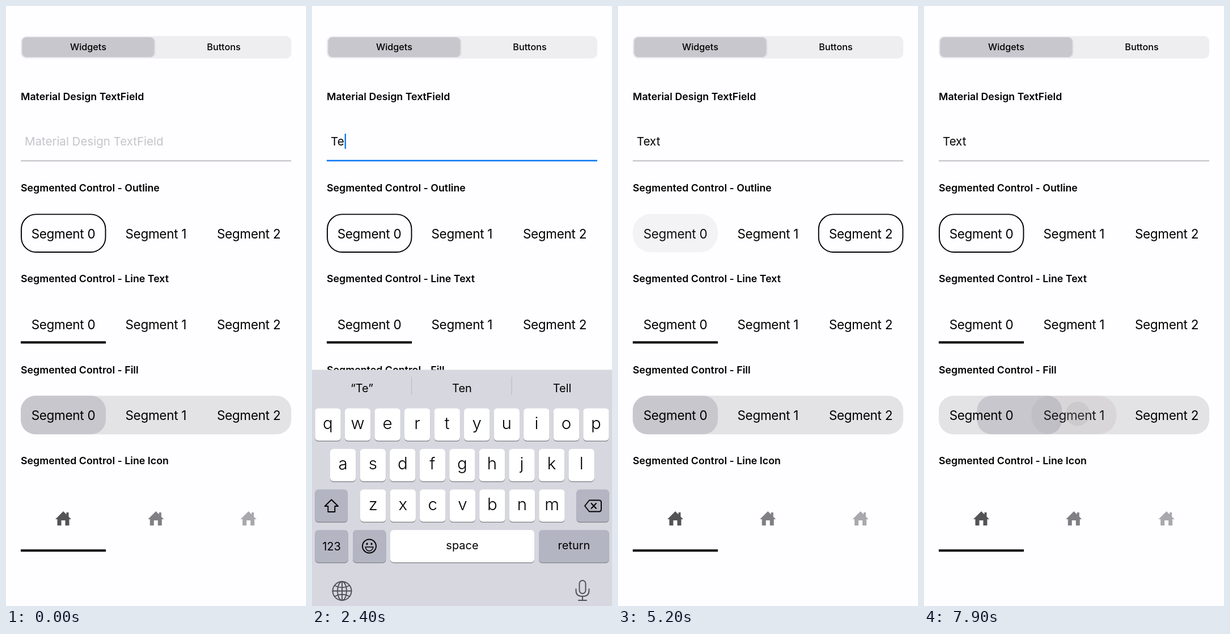
These frames come from a looping animation (529x1058 px, 8000 ms). An HTML page:

```html
<!DOCTYPE html>
<html lang="en">
<head>
<meta charset="utf-8">
<title>Widgets</title>
<style>
  html, body { margin: 0; width: 100%; height: 100%; overflow: hidden; background: #fefdff; }
  svg { display: block; width: 100%; height: 100%; font-family: Inter, "Open Sans", sans-serif; }
  .heading { font-size: 17.8px; font-weight: 600; }
  .tab { font-size: 16.2px; font-weight: 500; }
  .segment { font-size: 22.5px; letter-spacing: -.3px; }
  .field { font-size: 20.5px; }
  .letter { font-size: 27.5px; }
  .small.letter { font-size: 29.5px; font-weight: 300; }
  .label { font-size: 20px; }
  .preview { font-size: 40px; }
  .mid { text-anchor: middle; }
  .ink { fill: none; stroke: #000; stroke-width: 1.9; stroke-linejoin: round; stroke-linecap: round; }
  .tool { fill: none; stroke: #4e5057; stroke-width: 1.9; stroke-linecap: round; }
</style>
</head>
<body>
<svg id="stage" viewBox="0 0 529 1058"></svg>
<script>
const LOOP = 8000, STEP = 100;
const BLUE = '#0f7af0', DARK_KEY = '#b3b5c2', KEYBOARD_HEIGHT = 417;
const stage = document.getElementById('stage');

function set(node, attrs) {
  for (const name in attrs) node.setAttribute(name, attrs[name]);
  return node;
}
function add(parent, tag, attrs) {
  return parent.appendChild(set(document.createElementNS('http://www.w3.org/2000/svg', tag), attrs));
}
function box(parent, x, y, width, height, rx, fill, more) {
  return add(parent, 'rect', { x, y, width, height, rx, fill, ...more });
}
function write(parent, x, y, style, content, more) {
  const node = add(parent, 'text', { x, y, class: style, ...more });
  node.textContent = content;
  return node;
}
function path(parent, d, more) {
  return add(parent, 'path', { d, ...more });
}
function show(node, visible) {
  node.style.display = visible ? '' : 'none';
}
const clamp = u => Math.max(0, Math.min(1, u));
const easeOut = u => 1 - (1 - clamp(u)) ** 4;

// Tab bar
box(stage, 26, 53, 477, 39.5, 9.5, '#eeedf0');
box(stage, 27.5, 55, 236, 36, 8.5, '#e0dfe3');
box(stage, 28.5, 55, 233, 35, 8, '#c8c7ce');
write(stage, 145, 78.3, 'tab mid', 'Widgets', { 'font-weight': 600 });
write(stage, 384, 78.3, 'tab mid', 'Buttons');

['Material Design TextField', 'Segmented Control - Outline', 'Segmented Control - Line Text',
 'Segmented Control - Fill', 'Segmented Control - Line Icon']
  .forEach((title, i) => write(stage, 26, 166.4 + i * 160.4, 'heading', title));

// Touch ripples
const ripples = [];
function addRipple(start, x, y, width, height, rx, cx, cy, speed) {
  const id = 'clip' + ripples.length;
  box(add(stage, 'clipPath', { id }), x, y, width, height, rx, '#000');
  const group = add(stage, 'g', { 'clip-path': `url(#${id})`, fill: '#969598' });
  const back = add(group, 'rect', { x, y, width, height });
  const circle = add(group, 'circle', { cx, cy, 'fill-opacity': .19 });
  ripples.push({ start, speed, group, back, circle });
}
function drawRipple({ start, speed, group, back, circle }, t) {
  const age = t - start;
  show(group, age >= 0 && age < 500);
  if (age < 0) return;
  set(back, { 'fill-opacity': .1 + .12 * clamp(age / 200) });
  set(circle, { r: age * speed });
  set(group, { opacity: 1 - clamp((age - 250) / 250) });
}

// Text field
const placeholder = write(stage, 33, 246.3, 'field', 'Material Design TextField', { fill: '#c5c4c9' });
const typed = write(stage, 33, 246.3, 'field', '');
addRipple(1000, 26, 206, 477, 66, 0, 269, 240, 1.08);
const underline = box(stage, 26, 272, 477, 2, 0, '#bcbbc0');
const caret = box(stage, 33, 225, 2.4, 27, 1, BLUE);

// Segmented controls
const segmentX = i => 26 + i * 163.4;
const controls = [];
function addControl(top, radius, marker, taps) {
  [101, 264.3, 428].forEach((x, i) => write(stage, x, top + 43, 'segment mid', 'Segment ' + i));
  for (const [start, index, cx, cy] of taps)
    addRipple(start, segmentX(index), top, 150, 68, radius, cx, cy, .225);
  controls.push({ marker, taps });
}
function drawControl({ marker, taps }, t) {
  let index = 0;
  for (const [start, next] of taps) index += (next - index) * clamp((t - start) / 230);
  set(marker, { transform: `translate(${index * 163.4})` });
}

const outline = box(stage, 27, 367.4, 148.5, 66.6, 26, 'none', { stroke: '#000', 'stroke-width': 1.9 });
addControl(366.5, 32, outline, [
  [3990, 1, 268, 400], [4550, 2, 430, 402], [5200, 0, 101, 401]]);

const bar = box(stage, 26, 591.2, 150, 4, 0, '#000');
addControl(527, 0, bar, [
  [6015, 1, 268, 563], [6515, 2, 429, 565], [7110, 0, 101, 563]]);

box(stage, 26, 687.3, 477, 68, 26, '#e3e2e4');
const thumb = box(stage, 26, 687.3, 150, 68, 26, '#c8c7ce');
addControl(687.3, 32, thumb, [[7805, 1, 271, 719]]);

['#545356', '#807f83', '#a9a8ac'].forEach((fill, i) =>
  path(stage, 'M-14 1L0-13 5.5-7.5V-11H9.5V-3.5L14 1H10.5V12H3.5V3H-3.5V12H-10.5V1Z',
    { fill, transform: `translate(${101 + i * 163.3} 904)` }));
box(stage, 26, 958.2, 150, 4, 0, '#000');

// Keyboard
const keyboard = add(stage, 'g', {});
box(keyboard, 0, 641.5, 529, KEYBOARD_HEIGHT, 0, '#d6d7df');
for (const x of [175, 351.5]) box(keyboard, x, 654, 1.2, 32, 0, '#bdbec6');
const suggestions = [88, 264.5, 441].map(x => write(keyboard, x, 681.3, 'label mid', ''));

function addKey(x, y, width, fill) {
  box(keyboard, x, y + 1.6, width, 57, 6, '#8b8c92');
  return box(keyboard, x, y, width, 57, 6, fill);
}
const letters = {};
[['qwertyuiop', 5.3, 709.5], ['asdfghjkl', 32, 781], ['zxcvbnm', 85, 852.5]].forEach(([row, left, y]) => {
  [...row].forEach((name, i) => {
    const x = left + i * 52.55;
    addKey(x, y, 45.4, '#fff');
    letters[name] = { x: x + 22.7, y, node: write(keyboard, x + 22.7, y, 'letter mid', name) };
  });
});
const shift = addKey(5.3, 852.5, 57.5, '#fff');
const arrow = path(keyboard, 'M34.3 870.5L46 882H40.3V892H28.3V882H22.6Z', { class: 'ink' });
addKey(466.3, 852.5, 57.5, DARK_KEY);
path(keyboard, 'M489 871.5H506Q510 871.5 510 875.5V887.5Q510 891.5 506 891.5H489L481 881.5ZM492.5 877L501 886M501 877L492.5 886',
  { class: 'ink' });
addKey(5.3, 924, 58.5, DARK_KEY);
write(keyboard, 34.5, 959.5, 'label mid', '123');
addKey(72, 924, 58.5, DARK_KEY);
add(keyboard, 'circle', { cx: 101, cy: 952.5, r: 12, class: 'ink' });
for (const cx of [97, 105]) add(keyboard, 'ellipse', { cx, cy: 948.5, rx: 1.5, ry: 2 });
path(keyboard, 'M94 954H108Q106 961 101 961T94 954Z', { class: 'ink', style: 'stroke-width: 1.3' });
addKey(138, 924, 254, '#fff');
write(keyboard, 265, 958.3, 'label mid', 'space');
addKey(400, 924, 123.8, DARK_KEY);
write(keyboard, 462, 958.3, 'label mid', 'return');

path(keyboard, 'M36.5 1031.5H69.5M53 1015V1048M40 1022Q53 1029 66 1022M40 1041Q53 1034 66 1041', { class: 'tool' });
add(keyboard, 'circle', { cx: 53, cy: 1031.5, r: 16.5, class: 'tool' });
add(keyboard, 'ellipse', { cx: 53, cy: 1031.5, rx: 8, ry: 16.5, class: 'tool' });
box(keyboard, 471.5, 1013, 11, 23, 5.5, 'none', { class: 'tool' });
path(keyboard, 'M465.5 1028V1031Q465.5 1041 477 1041T488.5 1031V1028M477 1041V1048M470 1048H484', { class: 'tool' });

// Pressed key preview, drawn around the top centre of a key
const popup = add(keyboard, 'g', {});
path(popup, 'M-27-80H27Q39.5-80 39.5-67V-37C39.5-15 22.7-17 22.7 5V52Q22.7 58 16.7 58H-16.7Q-22.7 58-22.7 52V5C-22.7-17-39.5-15-39.5-37V-67Q-39.5-80-27-80Z',
  { fill: '#fff', style: 'filter: drop-shadow(0 1px 2px #0006)' });
const preview = write(popup, 0, -30, 'preview mid', '');

// Each press shows its preview for a moment, then the letter is entered
const presses = [
  { key: 't', down: 1750, up: 1900, words: ['“T”', 'The', 'This'] },
  { key: 'e', down: 2150, up: 2300, words: ['“Te”', 'Ten', 'Tell'] },
  { key: 'x', down: 2480, up: 2600, words: ['“Tex”', 'Text', 'Texts'] },
  { key: 't', down: 2780, up: 2900, words: ['“Text”', 'Texting', 'Texted'] }
];

function drawTyping(t) {
  const entered = presses.filter(press => t >= press.up);
  const upper = entered.length === 0;
  const text = entered.map((press, i) => i ? press.key : press.key.toUpperCase()).join('');
  const words = upper ? ['', '', ''] : entered[entered.length - 1].words;
  const cased = name => upper ? name.toUpperCase() : name;

  typed.textContent = text;
  show(placeholder, upper);
  suggestions.forEach((node, i) => node.textContent = words[i]);
  for (const name in letters) {
    const { y, node } = letters[name];
    node.textContent = cased(name);
    set(node, { y: y + (upper ? 38.6 : 36.4), class: upper ? 'letter mid' : 'small letter mid' });
  }
  set(shift, { fill: upper ? '#fff' : DARK_KEY });
  set(arrow, { style: `fill: ${upper ? '#000' : 'none'}` });

  const pressed = presses.find(press => t >= press.down && t < press.up);
  show(popup, pressed);
  if (pressed) {
    const { x, y } = letters[pressed.key];
    set(popup, { transform: `translate(${x} ${y})` });
    preview.textContent = cased(pressed.key);
  }

  show(caret, t >= 1000 && t < 3200);
  set(caret, { x: 33 + (text ? typed.getComputedTextLength() + 1 : 0) });
}

function draw(t) {
  const focused = t >= 1000 && t < 3400;
  set(underline, focused ? { y: 271.4, height: 2.6, fill: BLUE } : { y: 272.2, height: 1.8, fill: '#bcbbc0' });

  const raised = easeOut((t - 1050) / 500) - easeOut((t - 3310) / 290);
  show(keyboard, raised > 0);
  set(keyboard, { transform: `translate(0 ${KEYBOARD_HEIGHT * (1 - raised)})` });

  drawTyping(t);
  controls.forEach(control => drawControl(control, t));
  ripples.forEach(ripple => drawRipple(ripple, t));
}

// The picture advances ten times a second
const start = performance.now();
function tick() {
  const t = (performance.now() - start + 15) % LOOP;
  draw(Math.floor(t / STEP) * STEP);
  requestAnimationFrame(tick);
}
tick();
</script>
</body>
</html>
```
